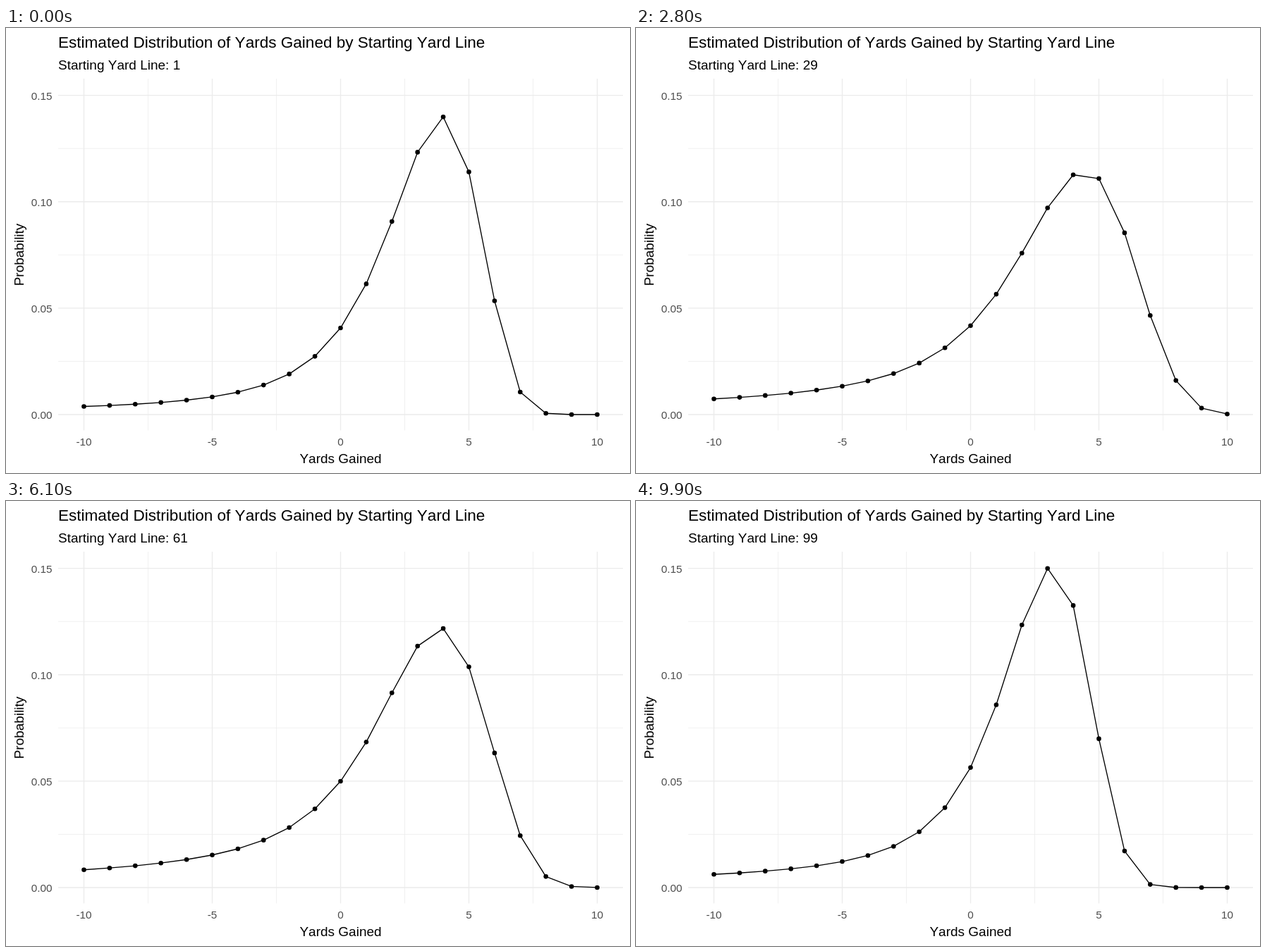
An HTML page that plays this animation: 885x632 px, repeating every 10000 ms.

```html
<!DOCTYPE html>
<html lang="en">
<head>
<meta charset="utf-8">
<title>Yards gained</title>
<style>
  html, body { margin: 0; width: 100%; height: 100%; overflow: hidden; background: #fff; }
  svg { display: block; width: 885px; height: 632px; }
  text { font-family: "Liberation Sans", Arial, sans-serif; font-size: 19px; font-kerning: none; }
  .title { font-size: 22.55px; }
  .tick { font-size: 15.3px; fill: #4d4d4d; }
  .mid { text-anchor: middle; }
  .end { text-anchor: end; }
  .grid { stroke: #ebebeb; stroke-width: 1.35; }
  .minor { stroke-width: 0.75; }
  #curve { fill: none; stroke: #000; stroke-width: 1.35; stroke-linejoin: round; }
</style>
</head>
<body>
<svg viewBox="0 0 885 632">
  <g id="grid"></g>
  <polyline id="curve"/>
  <g id="dots"></g>
  <text class="title" x="74" y="28">Estimated Distribution of Yards Gained by Starting Yard Line</text>
  <text id="label" x="74" y="58.5"></text>
  <text class="mid" x="474.5" y="618">Yards Gained</text>
  <text class="mid" transform="translate(25 322) rotate(-90)">Probability</text>
</svg>
<script>
const STEP = 100, STEPS = 100, FIRST = 1, LAST = 99;
const px = gain => 474.5 + 36.4 * gain;
const py = prob => 549 - 3023 * prob;
const el = id => document.getElementById(id);

function add(parent, tag, attrs, text = '') {
  const node = document.createElementNS('http://www.w3.org/2000/svg', tag);
  for (const key in attrs) node.setAttribute(key, attrs[key]);
  node.textContent = text;
  return parent.appendChild(node);
}

// Distribution parameters change linearly between these yard lines
const keys = [
  { yard: 1, mu: 1.885, sigma: 5.15, left: 0.17, right: 2.075 },
  { yard: 7, mu: 2.4, sigma: 5.69, left: 0.313, right: 1.828 },
  { yard: 61, mu: 1.777, sigma: 4.92, left: 0.375, right: 1.743 },
  { yard: 99, mu: 1.43, sigma: 4, left: 0.27, right: 1.768 }
];

function paramsAt(yard) {
  const i = Math.max(1, keys.findIndex(k => k.yard >= yard));
  const a = keys[i - 1], b = keys[i], q = (yard - a.yard) / (b.yard - a.yard);
  const mix = name => a[name] + (b[name] - a[name]) * q;
  return { mu: mix('mu'), sigma: mix('sigma'), left: mix('left'), right: mix('right') };
}

// Sinh-arcsinh density with a separate weight for each tail
function density(x, { mu, sigma, left, right }) {
  const z = (x - mu) / sigma, w = Math.asinh(z);
  const up = Math.exp(right * w), down = Math.exp(-left * w);
  const r = (up - down) / 2, slope = (right * up + left * down) / 2;
  return slope * Math.exp(-r * r / 2) / (sigma * Math.sqrt(2 * Math.PI * (1 + z * z)));
}

const grid = el('grid');
const vline = (x, cls) => add(grid, 'line', { x1: x, x2: x, y1: 72, y2: 571.5, class: cls });
const hline = (y, cls) => add(grid, 'line', { x1: 74, x2: 875, y1: y, y2: y, class: cls });
for (let g = -7.5; g < 10; g += 5) vline(px(g), 'grid minor');
for (let i = 0; i < 3; i++) hline(py(0.025 + i * 0.05), 'grid minor');
for (let g = -10; g <= 10; g += 5) {
  vline(px(g), 'grid');
  add(grid, 'text', { x: px(g), y: 592.5, class: 'tick mid' }, g);
}
for (let i = 0; i < 4; i++) {
  const p = i * 0.05;
  hline(py(p), 'grid');
  add(grid, 'text', { x: 65.5, y: py(p) + 6.2, class: 'tick end' }, p.toFixed(2));
}

const gains = Array.from({ length: 21 }, (_, i) => i - 10);
const dots = gains.map(g => add(el('dots'), 'circle', { cx: px(g), r: 3.3 }));
let shown = -1;

function draw() {
  const step = Math.floor(performance.now() / STEP) % STEPS;
  if (step !== shown) {
    shown = step;
    const yard = FIRST + (LAST - FIRST) * step / (STEPS - 1);
    const params = paramsAt(yard);
    const ys = gains.map(g => py(density(g, params)));
    el('label').textContent = 'Starting Yard Line: ' + Math.round(yard);
    el('curve').setAttribute('points', ys.map((y, i) => px(gains[i]) + ',' + y).join(' '));
    dots.forEach((dot, i) => dot.setAttribute('cy', ys[i]));
  }
  requestAnimationFrame(draw);
}
draw();
</script>
</body>
</html>
```
